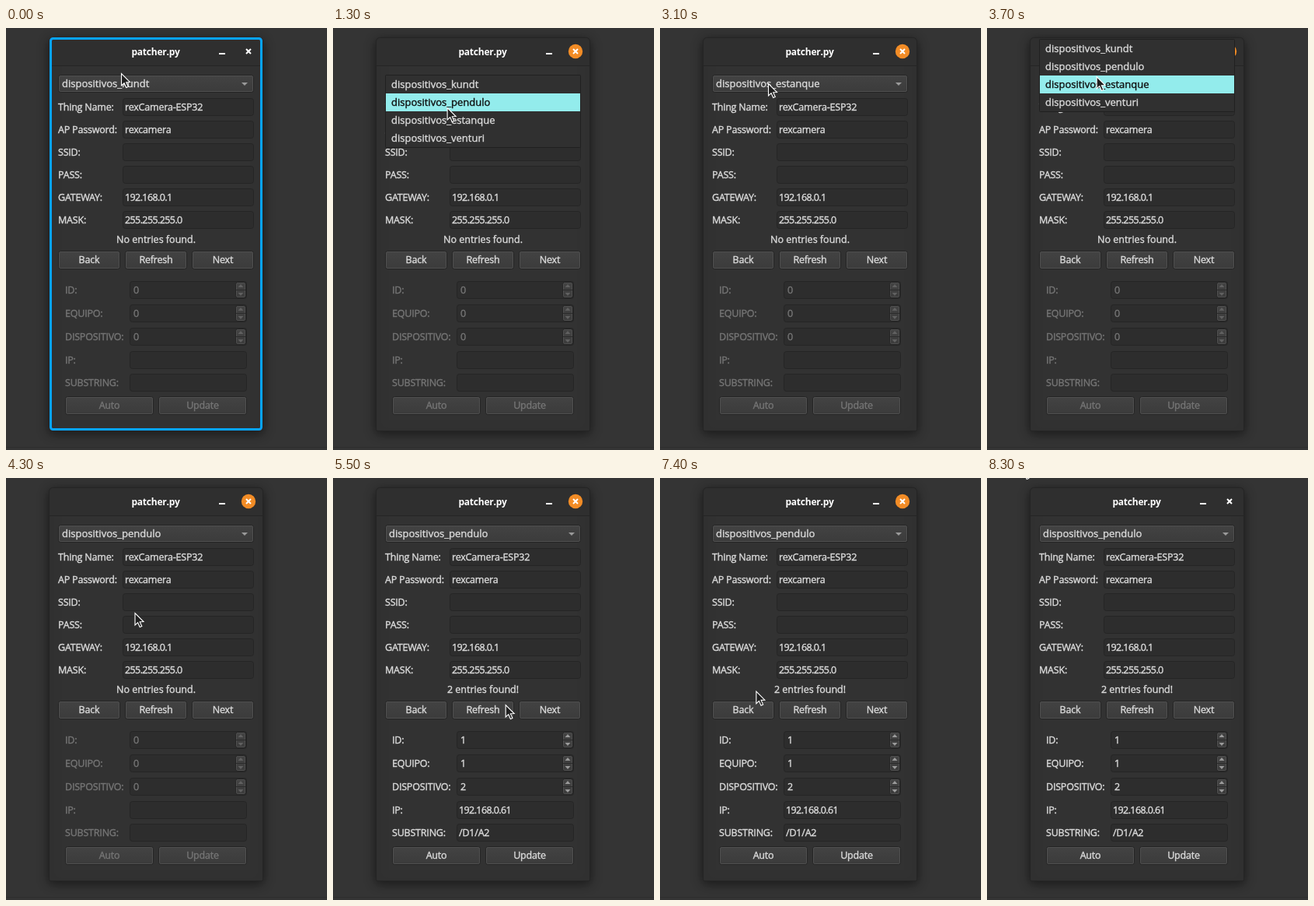
An HTML page with a canvas for the animation above (8400 ms loop, 413x542 px).

```html
<!DOCTYPE html>
<html lang="es">
<head>
<meta charset="utf-8">
<title>patcher.py</title>
<style>
html, body { margin: 0; width: 100%; height: 100%; overflow: hidden; background: #343434; }
canvas { display: block; }
</style>
</head>
<body>
<canvas id="stage" width="413" height="542"></canvas>
<script>
const ctx = document.getElementById('stage').getContext('2d');
const LOOP = 8400, STEP = 100;
const TEXT = '#dadada', DIM = '#757575', ROW = 23;
const DEVICES = ['kundt', 'pendulo', 'estanque', 'venturi'].map(n => 'dispositivos_' + n);
const SETTINGS = {
  'Thing Name:': 'rexCamera-ESP32', 'AP Password:': 'rexcamera', 'SSID:': '',
  'PASS:': '', 'GATEWAY:': '192.168.0.1', 'MASK:': '255.255.255.0'
};
const EMPTY = ['0', '0', '0', '', ''];
const FIRST = ['1', '1', '2', '192.168.0.61', '/D1/A2'];
const SECOND = ['2', '1', '1', '192.168.0.62', '/D1/A1'];

// Swinging between Next and Back while paging through the entries
const SWING = { start: 5855, end: 7205, period: 900, middle: 186, reach: 76, y: 296 };

// Straight pointer moves; it rests between them
const MOVES = [
  { from: 200, to: 400, x: 145, y: 70 },
  { from: 900, to: 1400, x: 147, y: 110 },
  { from: 2500, to: 3100, x: 139, y: 71 },
  { from: 3200, to: 3500, x: 140, y: 86 },
  { from: 3500, to: 3800, x: 141, y: 50 },
  { from: 4100, to: 4500, x: 190, y: 296 },
  { from: 4900, to: 5100, x: 141, y: 281 },
  { from: 5100, to: 5700, x: 262, y: 296 },
  { from: 7100, to: 7200, x: 110, y: 296 },
  { from: 7300, to: 7600, x: 150, y: 229 },
  { from: 7600, to: 8300, x: 44.5, y: -17 }
];

const within = (t, from, to) => t >= from && t < to;

function pointerAt(t) {
  if (within(t, SWING.start, SWING.end)) {
    const angle = (t - SWING.start) / SWING.period * 2 * Math.PI;
    return [SWING.middle + SWING.reach * Math.cos(angle), SWING.y];
  }
  let x = 148, y = 58;
  for (const move of MOVES) {
    if (t <= move.from) break;
    const p = Math.min(1, (t - move.from) / (move.to - move.from));
    x += (move.x - x) * p;
    y += (move.y - y) * p;
  }
  return [x, y];
}

// A hairline stroke gives the text a medium weight
function text(str, x, y, color = TEXT, { size = 12.5, weight = 400, gap = -0.2, align = 'left' } = {}) {
  ctx.font = `${weight} ${size}px "Open Sans", "Noto Sans", sans-serif`;
  ctx.letterSpacing = gap + 'px';
  ctx.textAlign = align;
  ctx.fillStyle = ctx.strokeStyle = color;
  ctx.fillText(str, x, y + 5);
  if (weight > 400) return;
  ctx.lineWidth = 0.4;
  ctx.strokeText(str, x, y + 5);
}

function box(x, y, w, h, fill, stroke, radius = 3) {
  ctx.beginPath();
  ctx.roundRect(x + 0.5, y + 0.5, w - 1, h - 1, radius);
  ctx.fillStyle = fill;
  ctx.fill();
  ctx.lineWidth = 1;
  ctx.strokeStyle = stroke;
  ctx.stroke();
}

function triangle(x, y, w, h, color) {
  ctx.beginPath();
  ctx.moveTo(x - w, y);
  ctx.lineTo(x + w, y);
  ctx.lineTo(x, y + h);
  ctx.fillStyle = color;
  ctx.fill();
}

function raised(x, y, w, h, pressed) {
  const fill = ctx.createLinearGradient(0, y, 0, y + h);
  fill.addColorStop(0, pressed ? '#292929' : '#434343');
  fill.addColorStop(1, pressed ? '#2c2c2c' : '#3b3b3b');
  box(x, y, w, h, fill, '#242424');
  if (!pressed) box(x + 1, y + 1, w - 2, h - 2, fill, '#505050', 2);
}

function button(label, x, y, w, color, pressed) {
  raised(x, y, w, 24, pressed);
  text(label, x + w / 2, y + 11, color, { align: 'center' });
}

function field(label, value, labelX, x, y, right, color = TEXT) {
  text(label, labelX, y, color);
  box(x, y - 11, right - x, ROW, '#2d2d2d', '#252525');
  text(value, x + 3, y, color, { gap: /^[\d.]+$/.test(value) ? -0.6 : -0.2 });
}

function spinner(label, value, y, color) {
  field(label, '', 76, 159, y, 310, color);
  text(value, 164, y, color);
  raised(295, y - 10, 14, 21);
  ctx.fillStyle = '#2b2b2b';
  ctx.fillRect(296, y, 12, 1);
  const arrow = color === DIM ? '#606060' : '#9a9a9a';
  triangle(302, y - 3, 3.5, -4, arrow);
  triangle(302, y + 4, 3.5, 4, arrow);
}

function windowFrame(selected, closeHot) {
  ctx.fillStyle = '#343434';
  ctx.fillRect(0, 0, 413, 542);
  ctx.fillStyle = '#2d2d2d';
  ctx.fillRect(0, 538, 413, 1);

  ctx.save();
  ctx.shadowColor = 'rgba(0,0,0,.5)';
  ctx.shadowBlur = 14;
  ctx.shadowOffsetY = 3;
  box(55, 12, 276, 506, '#323232', '#242424', [5, 5, 2, 2]);
  ctx.restore();
  ctx.beginPath();
  ctx.roundRect(56, 13, 274, 35, [5, 5, 0, 0]);
  ctx.fillStyle = '#2f2f2f';
  ctx.fill();
  ctx.fillStyle = '#252525';
  ctx.fillRect(56, 48, 274, 1);

  text('patcher.py', 192.5, 30, '#fff', { weight: 700, size: 12, align: 'center' });
  ctx.fillStyle = '#fff';
  ctx.fillRect(274, 32, 8, 2);
  if (closeHot) {
    ctx.beginPath();
    ctx.arc(312, 30, 9.2, 0, 7);
    ctx.fillStyle = '#f28c26';
    ctx.fill();
  }
  ctx.beginPath();
  for (const s of [-1, 1]) {
    ctx.moveTo(309, 30 - 3 * s);
    ctx.lineTo(315, 30 + 3 * s);
  }
  ctx.lineWidth = 2;
  ctx.strokeStyle = '#fff';
  ctx.stroke();

  if (selected) {
    ctx.beginPath();
    ctx.roundRect(57.5, 13.5, 271, 502, 3);
    ctx.lineWidth = 3;
    ctx.strokeStyle = '#08a4fb';
    ctx.stroke();
  }
}

function popup(top, active) {
  box(67, top - 1, 252, 94, '#303030', '#202020', 1);
  DEVICES.forEach((name, i) => {
    const y = top + i * ROW;
    if (i === active) {
      ctx.fillStyle = '#93ecec';
      ctx.fillRect(68, y, 250, ROW);
    }
    text(name, 75, y + 11, i === active ? '#111' : TEXT, { size: 13, gap: 0 });
  });
}

function pointer(x, y) {
  ctx.save();
  ctx.translate(x + 0.5, y + 0.5);
  const arrow = new Path2D('M0 0V15.5L3.6 12.2 6.2 18 8.8 16.9 6.2 11.2 11 11Z');
  ctx.fillStyle = '#202020';
  ctx.fill(arrow);
  ctx.lineWidth = 1.1;
  ctx.strokeStyle = '#fff';
  ctx.stroke(arrow);
  ctx.restore();
}

function draw(t) {
  const [px, py] = pointerAt(t);
  const loaded = t >= 4700;
  const color = loaded ? TEXT : DIM;
  // Each paging cycle presses Next, then Back
  const phase = within(t, 5900, 7400) ? (t - 5900) % SWING.period : -1;
  const values = !loaded ? EMPTY : within(phase, 100, 500) ? SECOND : FIRST;
  const device = t < 2300 ? 0 : t < 4100 ? 2 : 1;

  windowFrame(t < 600, within(t, 600, 8200));

  raised(67, 60, 252, ROW);
  text(DEVICES[device], 72, 71, TEXT, { size: 13, gap: 0 });
  triangle(307, 70, 4, 4, '#9a9a9a');

  Object.entries(SETTINGS).forEach(([label, value], i) =>
    field(label, value, 67, 150, 101 + i * 29, 319));

  const message = loaded ? '2 entries found!' : 'No entries found.';
  text(message, 193, 271, TEXT, { gap: 0, align: 'center' });
  const pressed = { Back: phase === 400, Refresh: t === 4600, Next: phase === 0 };
  Object.keys(pressed).forEach((label, i) =>
    button(label, 67 + i * 86, 286, 80, TEXT, pressed[label]));

  ['ID:', 'EQUIPO:', 'DISPOSITIVO:'].forEach((label, i) =>
    spinner(label, values[i], 336 + i * 30, color));
  ['IP:', 'SUBSTRING:'].forEach((label, i) =>
    field(label, values[3 + i], 76, 159, 426 + i * 29, 310, color));
  ['Auto', 'Update'].forEach((label, i) => button(label, 76 + i * 120, 473, 114, color));

  const top = within(t, 600, 2300) ? 61 : within(t, 3200, 4100) ? 15 : 0;
  if (top) popup(top, Math.floor((py - top) / ROW));
  pointer(px, py);
}

function tick() {
  const t = performance.now() % LOOP;
  draw(Math.floor(t / STEP) * STEP);
  requestAnimationFrame(tick);
}
tick();
</script>
</body>
</html>
```
